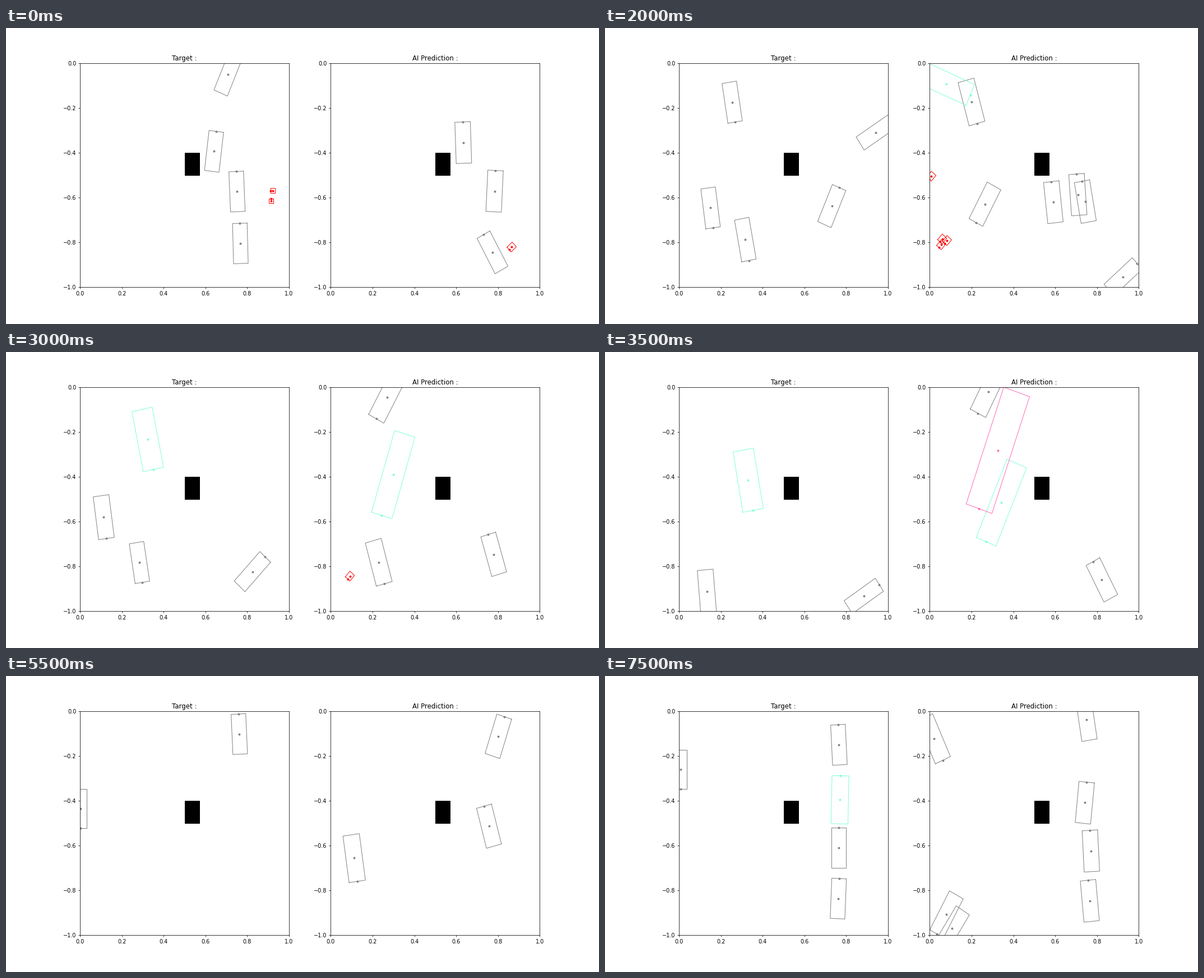
Write a matplotlib script that moves like this. It is 1058 by 529 pixels and loops after 8 s.

```python
import numpy as np
import matplotlib.pyplot as plt
from matplotlib.animation import FuncAnimation
from matplotlib.patches import Rectangle

FRAMES, INTERVAL = 16, 500
GRAY, AQUA, PINK, RED = "gray", "aquamarine", "hotpink", "red"
CAR, WIDE = (0.07, 0.18), (0.074, 0.185)    # width, length
FLOW, ONCOMING, FAST, QUEUE = -0.13, -0.305, -0.332, -0.184   # vertical speeds

plt.rcParams.update({"font.family": "DejaVu Sans", "font.size": 10})
# 15 x 7.5 inches gives 1058 x 529 pixels
fig, (truth, guess) = plt.subplots(1, 2, figsize=(15, 7.5), dpi=70.5334,
                                   facecolor="white")
fig.subplots_adjust(left=0.125, right=0.9, bottom=0.125, top=0.88, wspace=0.2)

for ax, title in ((truth, "Target :"), (guess, "AI Prediction :")):
    ax.set_xlim(0, 1)
    ax.set_ylim(-1, 0)
    ax.set_title(title)
    ax.add_patch(Rectangle((0.5, -0.5), 0.07, 0.1, color="black", lw=1))


def poly(coefs, s):
    return sum(c * s ** n for n, c in enumerate(np.atleast_1d(coefs)))


class Box:
    """A detected road user, drawn while its centre lies inside the panel.

    x, y, heading (degrees clockwise from up) and the sizes are constants or
    polynomial coefficients, lowest first, in the time since t0.
    """

    def __init__(self, ax, t0, x, y, heading=0, color=GRAY, size=CAR):
        self.t0 = t0
        self.motion = (x, y, heading, *size)
        self.outline, = ax.plot([], [], color=color, lw=1)
        self.dots, = ax.plot([], [], ".", color=color, ms=6)

    def show(self, t):
        x, y, heading, width, length = (poly(c, t - self.t0) for c in self.motion)
        visible = 0 <= x <= 1 and -1 <= y <= 0
        self.outline.set_visible(visible)
        self.dots.set_visible(visible)
        if not visible:
            return
        a = np.radians(heading)
        center = np.array([x, y])
        nose = length / 2 * np.array([np.sin(a), np.cos(a)])
        side = width / 2 * np.array([np.cos(a), -np.sin(a)])
        corners = [center + nose + side, center + nose - side,
                   center - nose - side, center - nose + side,
                   center + nose + side]
        self.outline.set_data(*np.transpose(corners))
        self.dots.set_data(*np.transpose([center, center + nose]))


def truth_boxes():
    # two cars ahead turning off to the right
    yield Box(truth, 0, (0.708, 0.0585), (-0.049, -0.065), (23, 8.5))
    yield Box(truth, 0, (0.641, 0.006, 0.0041), (-0.393, -0.04, -0.0053), (7, 0, 1))

    # parked cars and walkers
    yield Box(truth, 0, 0.751, (-0.573, FLOW), -2.5)
    yield Box(truth, 0, 0.767, (-0.805, FLOW), -1.6)
    walker = dict(color=RED, size=(0.021, 0.021))
    yield Box(truth, 0, (0.922, -0.0025), (-0.5685, FLOW), -90, **walker)
    yield Box(truth, 0, (0.915, -0.0025), (-0.6145, FLOW), 0, **walker)

    # oncoming lane
    yield Box(truth, 2, (0.104, 0.0233), (-0.036, ONCOMING), (169, 1.7))
    yield Box(truth, 2, (0.289, 0.014), (-0.178, ONCOMING), 169.5, size=(0.07, 0.19))
    yield Box(truth, 5, (0.269, 0.015), (-0.478, ONCOMING), 171)
    yield Box(truth, 5, (0.093, 0.02), (-0.248, FAST), (169.5, 2.8), size=(0.0755, 0.193))
    yield Box(truth, 9, (0.045, 0.004), (-0.453, FAST), 175, size=(0.07, 0.193))
    yield Box(truth, 5, (0.311, 0.0157, -0.003), (-0.036, -0.203, 0.0068),
              (167, 1.55), AQUA, (0.099, 0.274))

    # car peeking in at the left edge
    yield Box(truth, 13, (0.0093, 0.001, -0.0013), (-0.347, 0.0434), 180,
              size=(0.061, 0.175))

    # queue passed on the right
    for x, y, turn in ((0.765, -0.149, -3), (0.765, -0.609, 0), (0.762, -0.837, 2.4)):
        yield Box(truth, 15, x, (y, QUEUE), (turn, 1.3))
    yield Box(truth, 15, 0.770, (-0.395, QUEUE), (1.3, 1.4), AQUA, (0.081, 0.215))


def guess_boxes():
    def car(*motion, size=WIDE):
        return Box(guess, *motion, size=size)

    # right-hand side
    yield car(0, (0.634, 0.0075, 0.0028), (-0.354, -0.0714, 0.0079, -0.00115),
              (-2, 1, 0, -0.095))
    yield car(0, (0.784, -0.046), (-0.571, -0.11), (2.8, -4.7))
    yield car(0, 0.774, (-0.845, FLOW), -28.7, size=CAR)
    yield car(2, (0.715, 0.035, 0.035), (-0.4745, -0.24), (4.8, 12, 5), size=CAR)
    yield car(5, 0.5915, (-0.9525, FAST), -6.3)
    yield car(5, 0.7445, (-0.95, FAST), -10)
    yield car(9, (0.75, 0.0036), (-0.065, -0.224), (-19.7, 2.4))
    yield car(13, 0.6935, (-0.269, -0.37), -3, size=CAR)

    # queue passed on the right
    yield car(15, 0.75, (-0.037, QUEUE), -9)
    yield car(15, (0.742, -0.008), (-0.408, -0.158), (5.7, 8.4))
    yield car(15, (0.771, 0.002), (-0.624, QUEUE), (-3, 3.8))
    yield car(15, (0.766, -0.009), (-0.847, QUEUE), (-5.4, -5.8))

    # left-hand side
    yield car(5, 0.264, (-0.9615, FAST), 208)
    yield car(5, (0.2145, 0.015), (-0.477, ONCOMING), 164.7, size=(0.0785, 0.2))
    yield car(6, (0.269, 0.0107), (-0.045, 0.006, 0.02), (208.5, -1.5), size=(0.083, 0.216))
    yield car(9, 0.3124, (-0.7474, -0.38), 219.8, size=(0.083, 0.218))
    yield car(13, (0.13, -0.023, -0.016), (-0.389, 0.1335), (164, -4), size=(0.079, 0.21))
    yield car(15, (0.08, 0.06), -0.9075, 208.4, size=(0.075, 0.198))
    yield car(15, (0.107, 0.06), -0.97, 212.5, size=(0.075, 0.19))
    yield Box(guess, 5, (0.211, 0.11, -0.022), (-0.251, -0.1484, 0.0105, -0.00115),
              (167, 41.7, -11.9), AQUA, (0.102, (0.338, 0.066, -0.0227)))
    yield Box(guess, 7, 0.3258, (-0.281, -0.37), 199, PINK, (0.1306, 0.5526))

    # walkers
    walker = dict(color=RED, size=(0.029, 0.0335))
    yield Box(guess, 0, (0.8657, 0.018), (-0.821, FLOW), 227, **walker)
    for x, y in ((0.0495, -0.674), (0.1013, -0.955), (0.1242, -0.962), (0.0965, -0.981)):
        yield Box(guess, 5, (x, 0.042), (y, -0.17), 221, **walker)


boxes = [*truth_boxes(), *guess_boxes()]


def draw(frame):
    for box in boxes:
        box.show(frame)
    return []


anim = FuncAnimation(fig, draw, frames=FRAMES, interval=INTERVAL,
                     repeat=True, repeat_delay=0, blit=False)
plt.show()
```
